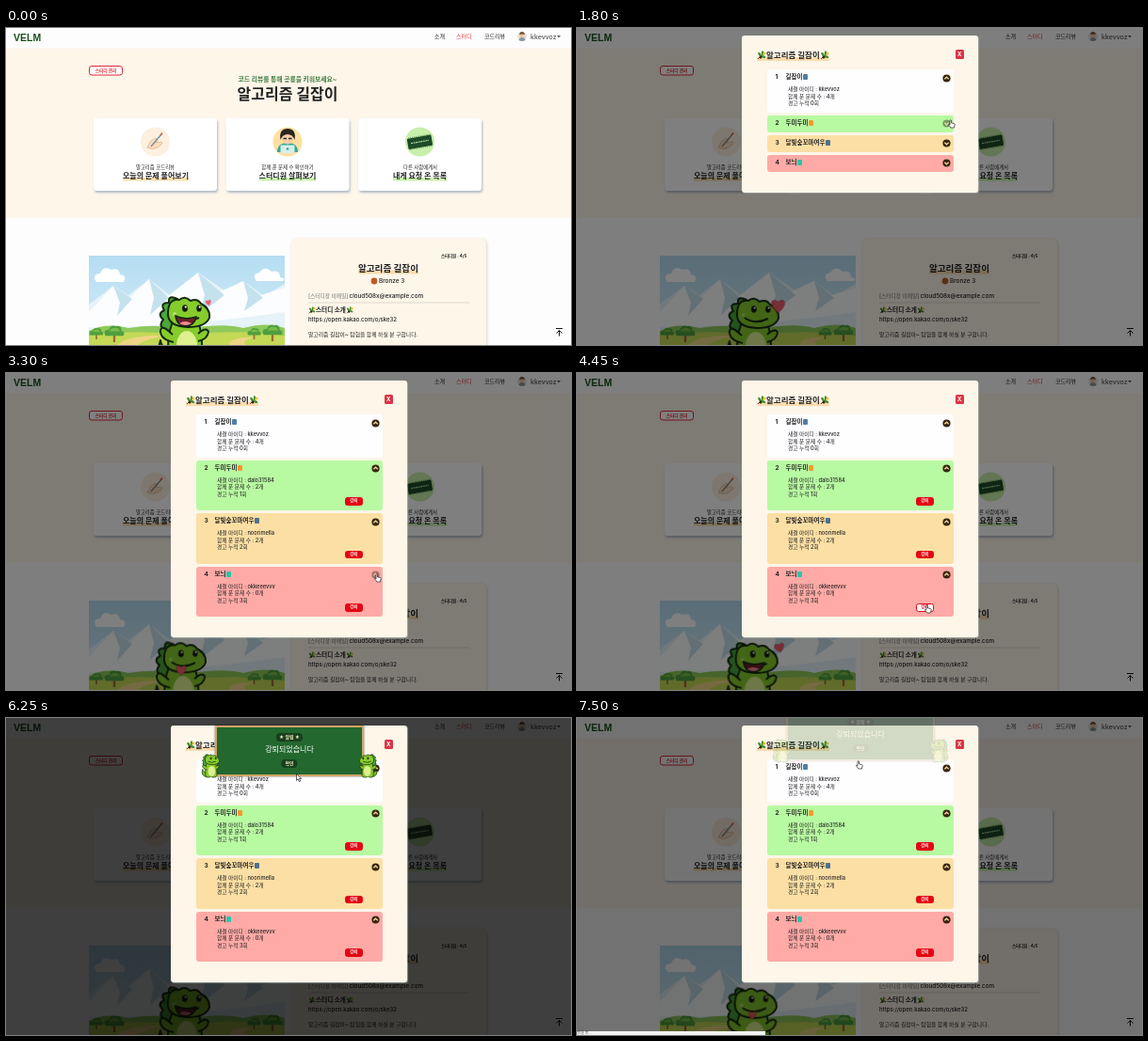
An HTML page for the animation above (7550 ms loop, 600x337 px).

```html
<!DOCTYPE html>
<html>
<head>
<meta charset="utf-8">
<title>Study members</title>
<style>
  html, body { margin: 0; width: 100%; height: 100%; overflow: hidden; }
  body { position: relative; background: #fefdfe; color: #222; font-family: Inter, "Noto Sans CJK KR", "Noto Sans CJK", sans-serif; }
  svg { display: block; overflow: visible; }
  #page, .shade, .picture, .modal, .alert, .cursor, .status { position: absolute; }
  #page { left: 0; top: 0; width: 600px; height: 337px; overflow: hidden; }
  #page text { font-weight: 500; fill: #222; }
  #page .b { font-weight: 700; }
  #page .mid { text-anchor: middle; }
  .card { fill: #fff; filter: drop-shadow(1.5px 2px 1.2px #7d93ad99); }
  .picture { left: 88px; top: 242px; width: 208px; height: 95px; overflow: hidden; }
  .shade { inset: 0; background: #000; opacity: 0; }

  .modal { left: 175px; top: 8px; width: 197px; padding: 36px 27px 19px; background: #fdf6e9; border-radius: 3px; opacity: 0; box-shadow: 1px 1px 1px #b4bcb899; }
  .title { position: absolute; left: 16px; top: 14px; height: 13px; display: flex; align-items: center; font-weight: 700; font-size: 8.5px; line-height: 12px; white-space: nowrap; background: linear-gradient(transparent 70%, #fcdcae 70%); }
  .title svg { width: 10px; height: 10px; }
  .close { position: absolute; left: 226.5px; top: 15px; width: 9.5px; height: 9.5px; border-radius: 1.5px; background: #dc3545; color: #fff; font: 700 6px/9.5px Inter, sans-serif; text-align: center; }
  .item { position: relative; width: 198px; height: 18px; margin-bottom: 3px; overflow: hidden; border-radius: 3px; background: var(--c); white-space: nowrap; }
  .item b { position: absolute; top: 0; font-size: 6.5px; line-height: 17.5px; }
  .num { left: 8.5px; }
  .name { left: 19.5px; }
  .tier { display: inline-block; width: 5px; height: 6px; margin-left: 1px; border-radius: 1px; vertical-align: -1px; background: var(--t); }
  .info { position: absolute; left: 22px; top: 17px; font-size: 5.7px; line-height: 7.5px; font-weight: 500; }
  .chev { position: absolute; left: 186px; top: 4.5px; width: 9px; height: 9px; }
  .kick { position: absolute; left: 158px; top: 39.5px; width: 16.6px; height: 6.9px; border: .6px solid #e30613; border-radius: 2.5px; background: #e30613; color: #fff; font-weight: 700; font-size: 4.5px; line-height: 6.7px; text-align: center; }

  .alert { left: 222px; top: 8px; width: 154px; height: 50px; border: 2px solid #cfa468; background: #23682f; color: #fff; text-align: center; opacity: 0; box-shadow: 0 0 2px #0008; }
  .alert div { position: absolute; left: 50%; transform: translateX(-50%); white-space: nowrap; }
  .pill { background: #17401d; border-radius: 4px; font-size: 5px; line-height: 9px; font-weight: 600; color: #f8efc2; }
  .alert svg { position: absolute; top: 28px; width: 22px; height: 26px; }
  .cursor { left: 0; top: 0; width: 8px; height: 10px; opacity: 0; }
  .cursor svg { position: absolute; width: 8px; height: 10px; }
  .status { left: 0; bottom: 0; width: 200px; height: 4.5px; background: #f3f3f3; color: #444; font-size: 4px; line-height: 4.5px; opacity: 0; }
</style>
</head>
<body>
<svg width="0" height="0" style="position:absolute">
  <symbol id="dino" viewBox="0 0 56 76" overflow="visible">
    <g stroke="#14290f" stroke-width="2" stroke-linejoin="round">
      <path fill="#6fbf2c" d="M16 54Q6 60 4 48Q-3 70 18 72Z"/>
      <path fill="#4aa83a" d="M22 4Q12-1 13 8Q3 8 8 16Q0 20 7 26Q1 33 9 36Q6 43 16 45Z"/>
      <path fill="#86cc2c" d="M17 28Q10 46 13 66Q13 75 25 73L30 70 35 73Q50 75 48 64Q49 42 44 28Z"/>
      <ellipse fill="#def08f" stroke="none" cx="32" cy="54" rx="11" ry="16"/>
      <path fill="#86cc2c" d="M17 42Q5 30 4 38Q4 47 18 50M44 41Q53 33 55 39Q54 47 44 49"/>
      <path fill="#86cc2c" d="M12 20Q12 3 24 5Q30 0 36 6Q43 3 47 9Q57 14 56 24Q52 34 33 34Q12 33 12 20Z"/>
      <path fill="none" d="M20 23Q31 31 45 24"/>
    </g>
    <g fill="#11180e"><ellipse cx="30" cy="14" rx="2.9" ry="3.8"/><ellipse cx="45" cy="14" rx="2.7" ry="3.6"/></g>
    <g fill="#fff"><circle cx="30.8" cy="12.6" r="1.1"/><circle cx="45.7" cy="12.6" r="1.1"/></g>
    <circle cx="19" cy="20" r="2" fill="#b9e06a"/>
  </symbol>
  <symbol id="leaf" viewBox="0 0 10 10">
    <path d="M1 9L8 2" stroke="#6d4521"/>
    <g fill="#3f8f2d"><ellipse cx="3" cy="4" rx="1.3" ry="2.5" transform="rotate(-35 3 4)"/><ellipse cx="6" cy="2.6" rx="1.2" ry="2.3"/><ellipse cx="7" cy="6.5" rx="2.4" ry="1.2" transform="rotate(20 7 6.5)"/></g>
    <circle cx="8" cy="3" r="1.5" fill="#f1c232"/><circle cx="4" cy="7" r="1.5" fill="#352816"/>
  </symbol>
  <symbol id="tree" viewBox="0 0 24 20">
    <path d="M12 20V9" stroke="#9b6a38" stroke-width="2.5"/>
    <path fill="#4f9f3e" d="M2 13Q-1 6 6 6Q8 0 14 2Q20 1 20 7Q25 9 22 13Z"/>
    <path fill="#78bd4a" d="M6 8Q9 3 14 4Q18 5 18 8Z"/>
  </symbol>
</svg>

<svg id="page" viewBox="0 0 600 337">
  <path fill="#fdf6e9" d="M0 21.5h600v180H0z"/>
  <text class="b" x="8" y="13.5" font-size="10.5" style="font-family:'Liberation Sans',sans-serif;fill:#184f1c">VELM</text>
  <g font-size="6"><text x="455" y="11.4">소개</text><text x="478" y="11.4" style="fill:#e02b35">스터디</text><text x="508" y="11.4">코드리뷰</text></g>
  <circle cx="548" cy="9" r="5" fill="#e5e2dc"/><circle cx="548" cy="7.5" r="2.5" fill="#efc49b"/>
  <path fill="#6b5138" d="M545.2 7.3q.2-3.3 2.8-3.3t2.8 3.3q-2.6-1.8-5.6 0z"/><path fill="#8798a2" d="M544.5 13q.5-3 3.5-3t3.5 3q-3.5 2-7 0z"/>
  <text x="557" y="11.5" font-size="7" style="fill:#555">kkevvoz</text>
  <path fill="#555" d="M585 8h4l-2 2.3z"/>

  <rect x="88.5" y="40.5" width="35" height="9.5" rx="2.5" fill="#fff" stroke="#e02b35"/>
  <text class="b mid" x="106" y="47" font-size="4.7" style="fill:#e02b35">스터디 관리</text>
  <text class="b mid" x="299" y="56.6" font-size="6.8" style="fill:#3c7a3e">코드 리뷰를 통해 공룡을 키워보세요~</text>
  <text class="b mid" x="299" y="76" font-size="16">알고리즘 길잡이</text>

  <g class="card"><rect x="93" y="96" width="131" height="77" rx="3"/><rect x="233.5" y="96" width="131" height="77" rx="3"/><rect x="374" y="96" width="131" height="77" rx="3"/></g>
  <circle cx="158.5" cy="121" r="15.5" fill="#fdf0df"/><circle cx="299" cy="121" r="15.5" fill="#ffe0a0"/><circle cx="439.5" cy="121" r="15.5" fill="#c8efac"/>
  <path d="M150 127l4-7 5-3 2 2-2 3 6-1q2 1 0 3l-4 3q-5 3-11 0z" fill="#fbdcbd" stroke="#c09a7b" stroke-width=".5"/>
  <path d="M154 126l11-13" stroke="#7b8d96" stroke-width="1.4"/><path d="M164 114l2-2.5" stroke="#db604c" stroke-width="1.6"/>
  <path d="M288 132q0-10 11-10t11 10z" fill="#36a895"/><circle cx="299" cy="117" r="6.5" fill="#f8cfa6"/>
  <path d="M291.5 119q-2-12 7.500-12t7.500 12q-2-6-7.500-6t-7.500 6z" fill="#292522"/>
  <path d="M294.5 117.500h3.500m2 0h3.500" stroke="#282828" stroke-width="1.6"/><rect x="291.500" y="124.500" width="15" height="8.500" rx="1" fill="#d6eeea"/><circle cx="299" cy="128.500" r="1.300" fill="#36a895"/>
  <g transform="rotate(-10 439.5 121.5)"><rect x="426.500" y="115.500" width="26" height="11.500" rx="1" fill="#1d4a27"/><path d="M430 121h19" stroke="#a5cf9c" stroke-width="1.300" stroke-dasharray="2 .6"/><path d="M428 127.500h23M428 115h23" stroke="#6d9c56" stroke-dasharray="1 1"/></g>
  <path d="M124 159h70v3.500h-70z" fill="#fde0ae"/><path d="M269 159h60v3.500h-60zM411 159h57v3.500h-57z" fill="#c8f3ae"/>
  <g class="mid" font-size="5.4"><text x="158.5" y="150">알고리즘 코드리뷰</text><text x="299" y="150">함께 푼 문제 수 확인하기</text><text x="440" y="150">다른 사람에게서</text></g>
  <g class="mid" font-size="8"><text class="b" x="159" y="160">오늘의 문제 풀어보기</text><text class="b" x="299" y="160">스터디원 살펴보기</text><text class="b" x="439.5" y="160">내게 요청 온 목록</text></g>

  <rect x="302.5" y="223.5" width="207.5" height="130" rx="6" fill="#fdf6e9" style="filter:drop-shadow(1px 1px 1.5px #b9aa9477)"/>
  <text class="b" x="462" y="243.5" font-size="4.4">스터디원 : 4/5</text>
  <path d="M374 257.500h64v4h-64z" fill="#fcdcae"/>
  <text class="b mid" x="406" y="258.8" font-size="9.6">알고리즘 길잡이</text>
  <circle cx="391" cy="269" r="3.4" fill="#bd5d29"/><text x="396" y="271.4" font-size="6.4">Bronze 3</text>
  <text x="321" y="287.2" font-size="5.7" style="fill:#777">[스터디장 이메일]</text><text x="364.5" y="287.3" font-size="6.3">cloud508x@example.com</text>
  <path d="M321 292h171" stroke="#c9c3b9" stroke-width=".6"/>
  <use href="#leaf" x="321" y="296" width="8" height="8"/><text class="b" x="329" y="302.4" font-size="6.6">스터디 소개</text><use href="#leaf" x="361" y="296" width="8" height="8"/>
  <text x="321" y="311.7" font-size="6">https://open.kakao.com/o/ske32</text>
  <text x="321" y="327.6" font-size="5.8">알고리즘 길잡이~ 탐험을 함께 하실 분 구합니다.</text>
  <path d="M584 319.500h7M587.500 327.500v-6M584.500 324.500l3-3 3 3" fill="none" stroke="#111"/>
</svg>

<svg class="picture" viewBox="0 0 208 95">
  <defs><linearGradient id="sky" x2="0" y2="1"><stop stop-color="#b5ddf2"/><stop offset="1" stop-color="#d5edf7"/></linearGradient></defs>
  <path fill="url(#sky)" d="M0 0h208v95H0z"/>
  <path fill="#e6f3f9" d="M0 52L26 32l16 10 22-17 22 17 30-24 28 19 20-10 22 16 22-13v65H0z"/>
  <path fill="#fbfdfe" d="M0 60L26 32l8 16 10-4 20-19 8 20 12-2 32-25 10 22 14-2 24-11 12 17 32-10v26Q100 76 0 76z"/>
  <path fill="#c6e1ee" d="M26 32l7 18-3 14 16-18zM64 25l5 20-4 18 20-18zM116 18l7 24-5 20 26-20zM164 27l5 18-4 14 20-14z"/>
  <path fill="#fff" d="M8 28q-6-8 4-9q3-9 12-4q8-3 9 5q8 1 4 8zM178 27q-6-7 3-9q6-8 13-1q9-2 9 6q6 1 3 4z"/>
  <path fill="#8fc95b" d="M0 80q18-9 42-3 30-5 60 1 42-7 62-1 23-7 44 0v20H0z"/>
  <path fill="#c4d955" d="M0 85q50-7 100-1 57-6 108 1v10H0z"/>
  <path fill="#eed586" d="M30 95q8-8 36-10h16q-24 4-30 10zM150 95q-5-5 15-8h12q-17 3-10 8z"/>
  <use href="#tree" x="15" y="73" width="24" height="19"/><use href="#tree" x="183" y="72" width="24" height="19"/><use href="#tree" x="0" y="76" width="16" height="13"/><use href="#tree" x="167" y="76" width="17" height="13"/>
  <g id="body"><use href="#dino" width="56" height="76"/>
    <g id="mouth"><path fill="#6d1f2a" stroke="#14290f" stroke-width="1.500" d="M20 22Q30 27 42 23Q40 33 30 33Q21 32 20 22Z"/><path fill="#f48992" d="M24 30q6-4 13 0-6 4-13 0z"/></g>
  </g>
  <g id="heart"><path fill="#f05c68" stroke="#b92d42" stroke-width=".7" d="M0 7C-11-1-7-10 0-4C7-10 11-1 0 7Z"/></g>
</svg>

<div class="shade" id="shade1"></div>
<div class="shade" id="shade2"></div>

<section class="modal">
  <div class="title"><svg><use href="#leaf"/></svg>알고리즘 길잡이<svg><use href="#leaf"/></svg></div>
  <div class="close">X</div>
  <div id="list"></div>
</section>

<section class="alert">
  <div class="pill" style="top:6px;padding:0 3px">★ 알림 ★</div>
  <div style="top:17px;font-size:8px;line-height:12px">강퇴되었습니다</div>
  <div class="pill" style="top:33.5px;padding:0 4px">확인</div>
  <span id="pals">
    <svg style="left:-18px"><use href="#dino"/></svg>
    <svg style="right:-18px;transform:scaleX(-1)"><use href="#dino"/></svg>
  </span>
</section>

<div class="status">연결 중...</div>
<div class="cursor">
  <svg id="arrow" viewBox="0 0 8 10"><path d="M.5.5v7l1.7-1.6 1.2 2.8 1.3-.6-1.2-2.7h2.2z" fill="#fff" stroke="#222" stroke-width=".7"/></svg>
  <svg id="hand" viewBox="0 0 8 10"><path d="M2 1.1q.8-.9 1.5 0v2.8l3 .6q.8.3.7 1.2L6.5 9H3L.6 6q-.2-1 .7-.8l.7.7z" fill="#fff" stroke="#222" stroke-width=".7"/></svg>
</div>

<script>
  const LOOP = 7550;
  const members = [
    ['길잡이', 'kkevvoz', 4, '#fefdff', '#4e80a4'],
    ['두미두미', 'dalo31584', 2, '#b8faa2', '#f29b2e'],
    ['달빛숲꼬마여우', 'noorimella', 2, '#fcdfa4', '#4e718f'],
    ['보늬', 'okkeeevvv', 0, '#ffaaa6', '#2dc3a6']
  ];
  document.getElementById('list').innerHTML = members.map(([name, id, solved, color, tier], i) => `
    <div class="item" id="item${i}" style="--c:${color};--t:${tier}">
      <b class="num">${i + 1}</b><b class="name">${name}<i class="tier"></i></b>
      <svg class="chev" viewBox="0 0 9 9"><circle cx="4.5" cy="4.5" r="4.1" fill="#382711"/><path d="M2.3 3.7l2.2 2.1 2.2-2.1" fill="none" stroke="#f4d79c" stroke-width="1.2"/></svg>
      <div class="info">새결 아이디 : ${id}<br>함께 푼 문제 수 : ${solved}개<br>경고 누적 ${i}회</div>
      ${i ? '<div class="kick">강퇴</div>' : ''}
    </div>`).join('');

  // Each stop is [milliseconds, value]; the end values are held.
  function play(selector, prop, stops, easing = 'linear') {
    const all = [[0, stops[0][1]], ...stops, [LOOP, stops.at(-1)[1]]];
    const frames = all.map(([ms, value]) => ({ offset: ms / LOOP, [prop]: value, easing }));
    document.querySelector(selector).animate(frames, { duration: LOOP, iterations: Infinity });
  }
  const flip = (selector, prop, stops) => play(selector, prop, stops, 'steps(1)');
  const move = (x, y, extra = '') => `translate(${x}px, ${y}px) ${extra}`;
  const repeat = (period, stops) => [0, 1, 2, 3]
    .flatMap(k => stops.map(([ms, value]) => [ms + k * period, value]))
    .filter(([ms]) => ms < LOOP);

  play('.modal', 'opacity', [[300, 0], [450, 1]]);
  play('.modal', 'transform', [[300, move(0, -16)], [600, move(0, 0)]], 'ease-out');
  play('#shade1', 'opacity', [[300, 0], [450, .5]]);
  play('#shade2', 'opacity', [[5230, 0], [5380, .5], [7380, .5], [7530, 0]]);
  play('.alert', 'opacity', [[5230, 0], [5380, 1], [7380, 1], [7530, 0]]);
  play('.alert', 'transform', [[5240, move(0, -16)], [5540, move(0, 0)], [7380, move(0, 0)], [7500, move(0, -16)]], 'ease-out');
  flip('#pals', 'opacity', [[0, 0], [5350, 1]]);
  flip('.status', 'opacity', [[0, 0], [7450, 1]]);

  [1150, 1900, 2450, 2950].forEach((ms, i) => {
    play(`#item${i}`, 'height', [[ms, '18px'], [ms + 250, i ? '53.5px' : '45.5px']], 'ease');
    flip(`#item${i} .info`, 'opacity', [[0, 0], [ms, 1]]);
    flip(`#item${i} .chev`, 'transform', [[0, 'none'], [ms, 'rotate(180deg)']]);
  });
  [[800, 1450], [1650, 2070], [2250, 2620], [2780, 4100]].forEach(([from, to], i) =>
    flip(`#item${i} .chev`, 'opacity', [[0, 1], [from, .45], [to, 1]]));
  flip('#item3 .kick', 'background', [[0, '#e30613'], [4300, '#fff'], [5680, '#e30613']]);
  flip('#item3 .kick', 'color', [[0, '#fff'], [4300, '#e30613'], [5680, '#fff']]);

  const path = [
    [0, 312, 158], [300, 312, 158], [650, 388, 67], [900, 391, 51], [1350, 391, 51],
    [1700, 394, 97], [2000, 394, 97], [2300, 392, 154], [2550, 392, 154], [2800, 391, 213],
    [4050, 391, 213], [4400, 369, 246], [5650, 369, 246], [6200, 308, 59], [6300, 308, 59], [6700, 296, 45]
  ];
  play('.cursor', 'transform', path.map(([ms, x, y]) => [ms, move(x, y)]), 'ease-in-out');
  flip('.cursor', 'opacity', [[0, 0], [50, 1]]);
  const hand = [[0, 1], [320, 0], [800, 1], [1450, 0], [1650, 1], [2070, 0], [2250, 1], [2620, 0],
    [2780, 1], [4100, 0], [4300, 1], [5680, 0], [6500, 1]];
  flip('#hand', 'opacity', hand);
  flip('#arrow', 'opacity', hand.map(([ms, on]) => [ms, 1 - on]));

  const CYCLE = 2100;
  play('#body', 'transform', repeat(CYCLE, [
    [0, move(72, 42)], [350, move(68, 43)], [900, move(67, 44, 'rotate(-2deg)')],
    [1400, move(68, 42)], [1900, move(70, 43)]
  ]), 'ease-in-out');
  flip('#mouth', 'opacity', repeat(CYCLE, [[0, 1], [350, 0], [1950, 1]]));
  flip('#heart', 'opacity', repeat(CYCLE, [[0, 1], [800, 0], [1000, 1], [1950, 0]]));
  play('#heart', 'transform', repeat(CYCLE, [
    [0, move(127, 50, 'rotate(-12deg) scale(.4)')], [400, move(127, 50, 'rotate(-12deg) scale(.9)')],
    [800, move(128, 45, 'rotate(-12deg) scale(.8)')], [1000, move(98, 74, 'scale(.6)')],
    [1250, move(98, 74, 'scale(.8)')], [1650, move(125, 54)], [1950, move(126, 53)]
  ]));
</script>
</body>
</html>
```
